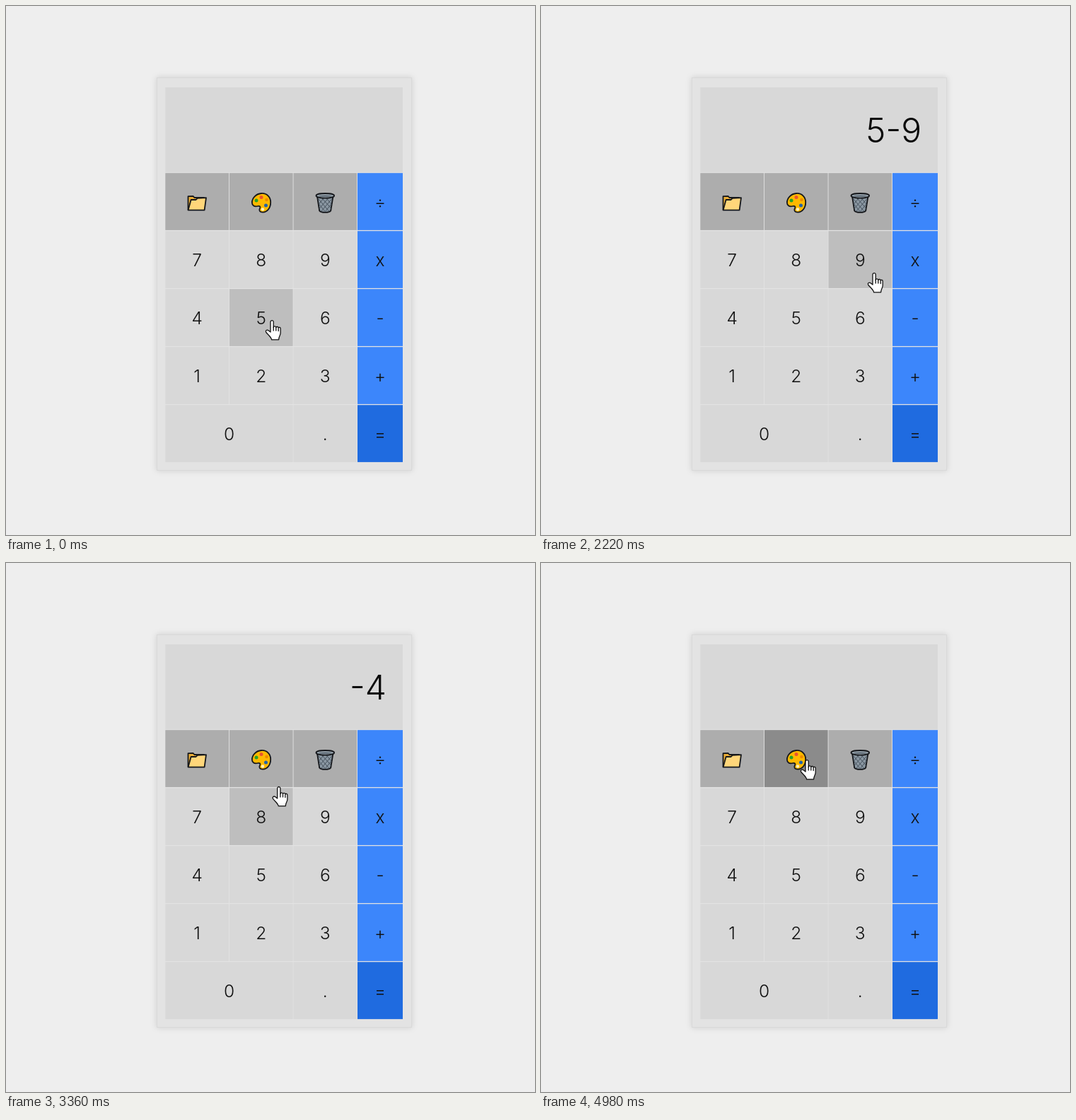
An HTML page that plays this animation: 748 px wide and 748 px high, repeating every 5.01 s.

```html
<!DOCTYPE html>
<html lang="en">
<head>
<meta charset="utf-8">
<title>Calculator</title>
<style>
html, body { margin: 0; width: 100%; height: 100%; overflow: hidden; background: #eee; }
svg { display: block; width: 100vw; height: 100vh; }
text { font: 300 24.5px Inter, sans-serif; text-anchor: middle; fill: #111; }
#display { font-size: 48px; text-anchor: end; fill: #080808; }
.panel { fill: #e3e3e3; stroke: #d9d9d9; filter: drop-shadow(0 0 4px #0002); }
.icon { stroke: #15171b; stroke-width: 1.8; stroke-linejoin: round; }
.icon .flat { stroke: none; }
</style>
</head>
<body>
<svg viewBox="0 0 748 748">
  <rect class="panel" x="213.5" y="101.5" width="360" height="555"/>
  <rect x="225.3" y="115" width="335.7" height="120.3" fill="#d8d8d8"/>
  <text id="display" x="538" y="193"></text>
  <g id="keys"></g>

  <g class="icon">
    <path d="M257.5 288V269.2l7-.4 2 2.2h13.5v17z" fill="#e9ac35"/>
    <path d="M257.6 288.6l4-14.6h7l2-2.2 12.4-.6-2.4 17.4z" fill="#ffd67a"/>
  </g>

  <g class="icon">
    <path d="M361 265c8-.6 13.2 5.5 13.2 12.5 0 8-4.700 14-11 14.200-4.400.1-6-2.700-4.300-5.400 1.400-2.500-.2-4-2.800-3.300-5 1.500-8.200-1-8.200-5 0-6.500 5.500-12.400 13.100-13z" fill="#ffb900"/>
    <g class="flat">
      <circle cx="361" cy="270.500" r="2.500" fill="#e8542f"/>
      <circle cx="368.500" cy="274" r="2.300" fill="#ef8b00"/>
      <circle cx="354" cy="275" r="2.500" fill="#27a327"/>
      <circle cx="367.500" cy="282" r="2.500" fill="#2463a8"/>
      <circle cx="363" cy="287.500" r="2.200" fill="#fff0c0"/>
    </g>
  </g>

  <g class="icon">
    <path d="M440 269l3.200 20.500c2 3.200 14 3.200 16 0L462.500 269z" fill="#8b98a3"/>
    <path d="M442 273l14.500 17M447 272l13 14.500M453 272l7.500 8.500M442.500 280l8.500 10.500M460.500 273l-14.500 17M455.500 272l-12.500 14.500M449 272l-6.500 8M460 280l-8.500 10.500" fill="none" stroke="#46515c" stroke-width="1"/>
    <ellipse cx="451.300" cy="268.300" rx="12.800" ry="3.300" fill="#a1adb6"/>
    <ellipse class="flat" cx="451.300" cy="268.700" rx="9.800" ry="1.500" fill="#65717c"/>
  </g>

  <g id="cursor" stroke="#111" stroke-width="1.3" stroke-linejoin="round" stroke-linecap="round">
    <path fill="#fff" d="M-1 17V2.700a2.100 2.100 0 0 1 4.200 0V10.500c.3-2.300 3.600-2 3.600.2.400-1.800 3.400-1.600 3.400.6.600-1.500 3-1 3 1V18c0 4-2.600 5-2.600 9.800H.6C0 24-4 21.500-7.200 17.500-8.700 15-6 13.200-4 14.700z"/>
    <path fill="none" d="M3.200 10.500v4.500M6.800 11v4M10.200 12v3.500"/>
  </g>
</svg>

<script>
const LOOP = 5010, HOVER_LAG = 60;
const $ = id => document.getElementById(id);
const colX = [225.3, 316, 406.5, 497], colW = [89.8, 89.600, 89.600, 64];
const styles = {
  digit: ['#d8d8d8', '#bebebe'],
  tool: ['#adadad', '#8b8b8b'],
  op: ['#3c86fb', '#216add'],
  equals: ['#1f6be0', '#054bb5']
};

// Time, x and y of the pointer tip.
const path = [
  [0, 375, 444], [570, 375, 444], [720, 482, 445], [780, 511, 441],
  [870, 520, 440], [1230, 520, 440], [1350, 505, 410], [1410, 487, 396],
  [1560, 470, 377], [2250, 470, 377], [2400, 484, 442], [2580, 523, 580],
  [2700, 533, 616], [3000, 533, 616], [3120, 470, 490], [3270, 390, 350],
  [3390, 383, 305], [3570, 382, 294], [4260, 382, 294], [4470, 452, 286],
  [4560, 464, 286], [4680, 480, 286], [4800, 488, 284], [4890, 395, 280],
  [4980, 375, 278], [LOOP, 375, 278]
];
const readings = [[0, ''], [570, '5'], [1050, '5-'], [1800, '5-9'], [2700, '-4'], [4620, '']];
const keys = [];

function add(tag, attrs) {
  const el = document.createElementNS('http://www.w3.org/2000/svg', tag);
  for (const name in attrs) el.setAttribute(name, attrs[name]);
  return $('keys').appendChild(el);
}

function addKey(label, row, col, kind, span = 1) {
  const x = colX[col], y = 236.2 + 82 * row, height = 80.7;
  const last = col + span - 1, width = colX[last] + colW[last] - x;
  const el = add('rect', { x, y, width, height });
  add('text', { x: x + width / 2, y: y + 49.900 }).textContent = label;
  keys.push({ el, x, y, width, height, colors: styles[kind] });
}

['', '789', '456', '123'].forEach((digits, row) => {
  for (let col = 0; col < 3; col++) addKey(digits[col] || '', row, col, row ? 'digit' : 'tool');
  addKey('÷x-+'[row], row, 3, 'op');
});
addKey('0', 4, 0, 'digit', 2);
addKey('.', 4, 2, 'digit');
addKey('=', 4, 3, 'equals');

function pointerAt(t) {
  const i = Math.max(1, path.findIndex(p => p[0] > t));
  const [t0, x0, y0] = path[i - 1], [t1, x1, y1] = path[i];
  const k = Math.max(0, (t - t0) / (t1 - t0));
  return [x0 + (x1 - x0) * k, y0 + (y1 - y0) * k];
}

function draw(now) {
  const t = now % LOOP;
  const [x, y] = pointerAt(t), [hx, hy] = pointerAt(t - HOVER_LAG);
  $('cursor').setAttribute('transform', `translate(${x} ${y})`);
  for (const k of keys) {
    const over = hx >= k.x && hx < k.x + k.width && hy >= k.y && hy < k.y + k.height;
    k.el.setAttribute('fill', k.colors[+over]);
  }
  $('display').textContent = readings.filter(r => r[0] <= t).pop()[1];
}

const start = performance.now();
function tick() {
  draw(performance.now() - start);
  requestAnimationFrame(tick);
}
tick();
</script>
</body>
</html>
```
